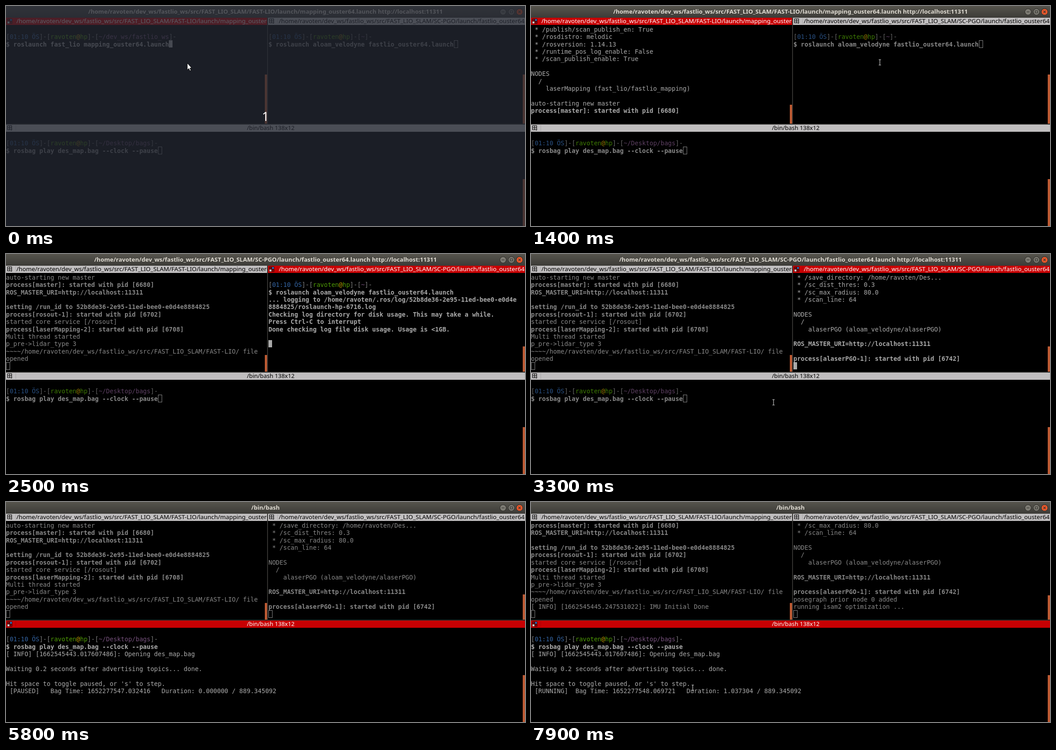
These frames come from a looping animation (1147 by 488 pixels, 8000 ms). An HTML page:

```html
<!DOCTYPE html>
<html lang="en">
<head>
<meta charset="utf-8">
<title>Terminal session</title>
<style>
html, body { margin: 0; width: 100%; height: 100%; overflow: hidden; background: #000; }
#stage { position: absolute; left: 0; top: 0; width: 1147px; height: 488px; overflow: hidden; background: #000; }
#stage div, #stage svg { position: absolute; }
#window { left: 0; top: 0; width: 1147px; height: 26px; background: linear-gradient(#56544d, #3c3b37); }
#caption { left: 0; width: 1147px; top: 3px; text-align: center; white-space: pre; color: #dfdbd2;
  font: bold 13.07px/19px "Noto Sans", "Open Sans", sans-serif; }
.bar { height: 16px; overflow: hidden; background: #c0bebf; color: #000; }
.bar.on { background: #c80003; color: #fff; }
.bar .name { top: 0; white-space: pre; font: 13.37px/15.5px "Noto Sans", "Open Sans", sans-serif; }
.bar .old { stroke: #000; }
.bar .live { display: none; }
.bar.on .old { display: none; }
.bar.on .live { display: block; }
.grip { left: 21px; top: 1px; width: 1px; height: 13px; background: #a9a7a8; }
.bar.on .grip { background: #b00003; }
.body { color: #aaa; opacity: .8; }
.body.on { opacity: 1; }
.text { left: 0; top: .7px; white-space: pre; font: 13.6px/16.38px "DejaVu Sans Mono", monospace; }
.text b { font-weight: bold; }
.k { color: #808080; } .t { color: #3465a4; } .u { color: #4e9a06; } .a { color: #c4a000; } .p { color: #75507b; }
.caret { box-sizing: border-box; width: 9px; height: 17px; border: 1px solid #aaa; }
.body.on .caret { width: 8px; height: 16px; background: #aaa; }
.scroll { width: 5px; background: #bd5a33; }
#split { left: 577px; top: 26px; width: 2px; height: 236px; background: #33322f; }
#sill { left: 0; top: 261px; width: 1147px; height: 2px; background: #2c2b29; }
#veil { inset: 0; background: rgba(37, 41, 51, .75); }
#count { left: 0; width: 1147px; top: 226px; text-align: center; color: #fff; font: 27px/37px "Noto Sans", sans-serif; }
</style>
</head>
<body>
<div id="stage">
  <div id="window">
    <div id="caption"></div>
    <svg width="60" height="26" style="left:1087px;top:-.5px" fill="none" stroke="#33322e" stroke-width="1.2">
      <circle cx="11.5" cy="13" r="7" fill="#7d7b73"/><path d="M8.5 13h6"/>
      <circle cx="30" cy="13" r="7" fill="#7d7b73"/><path d="M27.3 10.7h5.4v4.6h-5.4z"/>
      <circle cx="48" cy="13" r="7.2" fill="#e9582b"/><path d="M45.5 10.5l5 5m0-5l-5 5"/>
    </svg>
  </div>
  <div id="split"></div>
  <div id="sill"></div>
</div>
<script>
const LOOP = 8000, COL = 8.19, ROW = 16.38;
const stage = document.getElementById('stage');
const caption = document.getElementById('caption');

const add = (parent, cls, css = '', html = '') => {
  const el = document.createElement('div');
  el.className = cls;
  el.style.cssText = css;
  el.innerHTML = html;
  return parent.appendChild(el);
};

// Latest row of a [time, ...values] table that has begun
const at = (table, t) => table.filter(row => row[0] <= t).pop();

const HOME = '/home/ravoten';
const SRC = HOME + '/dev_ws/fastlio_ws/src/FAST_LIO_SLAM/';
const MAP = SRC + 'FAST-LIO/launch/mapping_ouster64.launch';
const PGO = SRC + 'SC-PGO/launch/fastlio_ouster64.launch';
const URI = 'http://localhost:11311';
const RUN = '52b8de36-2e95-11ed-bee0-e0d4e8884825';

const span = (c, s) => `<span class="${c}">${s}</span>`;
const prompt = dir => span('k', '[') + span('t', '01:10 ÖS') + span('k', ']-[') + span('u', 'ravoten') +
  span('a', '@') + span('u', 'hp') + span('k', ']-[') + span('p', dir) + span('k', ']-');

// A leading "!" marks a bold line
const line = s => s[0] === '!' ? `<b>${s.slice(1)}</b>` : s;

const start = (dir, cmd, pid, width, port) => {
  const log = `... logging to ${HOME}/.ros/log/${RUN}/roslaunch-hp-${pid}.log`;
  return ['', prompt(dir), '!$ roslaunch ' + cmd, '!' + log.slice(0, width), '!' + log.slice(width),
    '!Checking log directory for disk usage. This may take a while.', '!Press Ctrl-C to interrupt',
    '!Done checking log file disk usage. Usage is &lt;1GB.', '',
    `!started roslaunch server http://hp:${port}/`, '', 'SUMMARY', '========', '', 'PARAMETERS'];
};

const leftLog = [
  ...start('~/dev_ws/fastlio_ws', 'fast_lio mapping_ouster64.launch', 6669, 69, 38745),
  ' * /publish/scan_publish_en: True', ' * /rosdistro: melodic', ' * /rosversion: 1.14.13',
  ' * /runtime_pos_log_enable: False', ' * /scan_publish_enable: True', '', 'NODES', '  /',
  '    laserMapping (fast_lio/fastlio_mapping)', '', 'auto-starting new master',
  '!process[master]: started with pid [6680]', '!ROS_MASTER_URI=' + URI, '',
  '!setting /run_id to ' + RUN, '!process[rosout-1]: started with pid [6702]',
  'started core service [/rosout]', '!process[laserMapping-2]: started with pid [6708]',
  'Multi thread started', 'p_pre-&gt;lidar_type 3', `~~~~${SRC}FAST-LIO/ file`, 'opened',
  '[ INFO] [1662545445.247531022]: IMU Initial Done'
];

const rightLog = [
  ...start('~', 'aloam_velodyne fastlio_ouster64.launch', 6716, 67, 44651),
  ' * /mapviz_filter_size: 0.4', ' * /rosdistro: melodic', ' * /rosversion: 1.14.13',
  ` * /save_directory: ${HOME}/Des...`, ' * /sc_dist_thres: 0.3', ' * /sc_max_radius: 80.0',
  ' * /scan_line: 64', '', 'NODES', '  /', '    alaserPGO (aloam_velodyne/alaserPGO)', '',
  '!ROS_MASTER_URI=' + URI, '', '!process[alaserPGO-1]: started with pid [6742]',
  'posegraph prior node 0 added', 'running isam2 optimization ...'
];

const bagLog = ['', prompt('~/Desktop/bags'), '!$ rosbag play des_map.bag --clock --pause',
  '[ INFO] [1662545443.017607486]: Opening des_map.bag', '',
  'Waiting 0.2 seconds after advertising topics...', '',
  "Hit space to toggle paused, or 's' to step."];

// time, lines printed, scrollbar top
const leftSteps = [[0, 3, 152], [1200, 7, 152], [1300, 15, 212], [1400, 27, 219],
  [1500, 31, 221], [1600, 34, 223], [1800, 37, 224], [7000, 38, 224]];
const rightSteps = [[0, 3, 152], [2500, 9, 205], [2600, 15, 205], [2700, 22, 205],
  [2800, 28, 205], [2900, 30, 205], [7300, 31, 206], [7400, 32, 207]];
const bagSteps = [[0, 3], [4900, 4], [5100, 6], [5300, 8]];

// time, row, column; no row hides the caret
const bagCaret = [[0, 2, 41], [4200], [4600, 3, 0], [4900, 4, 0], [5100, 5, 47], [5300, 8, 0],
  [5800], [6400, 8, 0], [7500]];

const captions = [[0, `${MAP} ${URI}`], [1100, MAP], [1300, `${MAP} ${URI}`], [1800, `${PGO} ${URI}`],
  [2300, PGO], [2500, `${PGO} ${URI}`], [3600, '/bin/bash']];
const focus = [[0, 0], [1800, 1], [3600, 2]];

// time, shape, x, y
const pointerSteps = [[0, 'arrow', 400, 126], [500, 'beam', 402.5, 128.5], [700],
  [1100, 'beam', 520, 127], [1200, 'beam', 650, 125], [1300, 'beam', 770.5, 124.5], [2100],
  [3200, 'beam', 764.5, 134.5], [3300, 'beam', 535.5, 328.5], [3500, 'beam', 450.5, 426.5], [4600],
  [7800, 'beam', 357, 411.5]];

const icon = `<svg class="old" width="14" height="14" style="left:2px;top:1px" fill="none" stroke-width="1.2">
  <path d="M1.5 1.5h9v9h-9zM6 1.5v9M1.5 6h9"/><path d="M7.5 9.5h5l-2.5 3z" fill="#000" stroke="#c0bebf" stroke-width=".5"/></svg>
  <svg class="live" width="14" height="14" style="left:2px;top:1px" stroke="#300" stroke-width=".8">
  <path d="M1 7h5v5h-5z" fill="#ddd"/><path d="M6.5 1.5h5v5h-5z" fill="#2f6db5"/>
  <path d="M1 1.5h5v5h-5zM6.5 7h5v5h-5z" fill="#7a0a10"/></svg><div class="grip"></div>`;

const makePane = (x, w, top, rowTop, name, nameX, bottom) => {
  const bar = add(stage, 'bar', `left:${x}px;top:${top}px;width:${w}px`, icon);
  const label = add(bar, 'name', `left:${nameX}px`);
  label.textContent = name;
  const body = add(stage, 'body', `left:${x && x + 1}px;top:${rowTop}px;width:${w}px;height:${bottom - rowTop}px`);
  const text = add(body, 'text');
  const caret = add(body, 'caret');
  const scroll = add(stage, 'scroll', `left:${x + w - 5}px`);
  return { bar, label, body, text, caret, scroll, bottom };
};

const panes = [
  makePane(0, 577, 26, 43.3, `${MAP} ${URI}`, 23, 261),
  makePane(579, 568, 26, 43.3, `${PGO} ${URI}`, 24, 261),
  makePane(0, 1147, 263, 279.4, '/bin/bash 138x12', 532.5, 488)
];
panes[2].label.style.fontSize = '12.9px';

const veil = add(stage, '');
veil.id = 'veil';
const count = add(stage, '', '', '1');
count.id = 'count';

const pointer = add(stage, '');
const shapes = {
  arrow: '<svg width="12" height="20" style="left:0;top:0"><path d="M.7.7v15l3.4-3 2.3 5.2 2.4-1-2.3-5.1h4.2z" fill="#fff" stroke="#000"/></svg>',
  beam: '<svg width="7" height="15" style="left:-3.5px;top:-7.5px" fill="none" stroke="#ddd" stroke-width="1.1"><path d="M1 1.5h5M1 13.5h5M3.5 1.5v12"/></svg>'
};

const drawPane = (pane, on, lines, top, row, col) => {
  pane.bar.classList.toggle('on', on);
  pane.body.classList.toggle('on', on);
  pane.text.innerHTML = lines.map(line).join('\n');
  pane.scroll.style.top = top + 'px';
  pane.scroll.style.height = pane.bottom - top + 'px';
  const hidden = row === undefined;
  pane.caret.style.display = hidden ? 'none' : '';
  if (hidden) return;
  pane.caret.style.left = Math.round(col * COL) + 'px';
  pane.caret.style.top = row * ROW + 'px';
};

const drawLaunch = (pane, on, log, steps, t, enter, width, hideCaret) => {
  const [, n, top] = at(steps, t);
  const row = hideCaret ? undefined : t < enter ? 2 : Math.min(n, 12);
  drawPane(pane, on, log.slice(Math.max(0, n - 12), n), top, row, t < enter ? width : 0);
};

const bagLines = t => {
  const lines = bagLog.slice(0, at(bagSteps, t)[1]);
  if (t < 5300) return lines;
  lines[5] += ' done.';
  const running = t >= 6900;
  const d = running ? 0.292786 + (t - 7100) * 0.0009306479 : 0;
  lines.push(` ${running ? '[RUNNING] ' : '[PAUSED]  '} Bag Time: 16522775${(47.0324163 + d).toFixed(6)}` +
    `   Duration: ${d.toFixed(6)} / 889.345092`);
  return lines;
};

const draw = t => {
  const active = at(focus, t)[1];
  caption.textContent = at(captions, t)[1];
  drawLaunch(panes[0], active === 0, leftLog, leftSteps, t, 1000, 44, t >= 1300 && t < 1800);
  drawLaunch(panes[1], active === 1, rightLog, rightSteps, t, 2100, 50, false);
  const [, row, col] = at(bagCaret, t);
  drawPane(panes[2], active === 2, bagLines(t), 384, row, col);

  veil.style.display = count.style.display = t < 500 ? '' : 'none';
  const [, shape, x, y] = at(pointerSteps, t);
  pointer.innerHTML = shapes[shape] || '';
  pointer.style.transform = `translate(${x || 0}px, ${y || 0}px)`;
};

const begin = performance.now();
let shown = -1;
const frame = () => {
  const t = Math.floor(((performance.now() - begin) % LOOP) / 100) * 100;
  if (t !== shown) draw(shown = t);
  requestAnimationFrame(frame);
};
frame();
</script>
</body>
</html>
```
